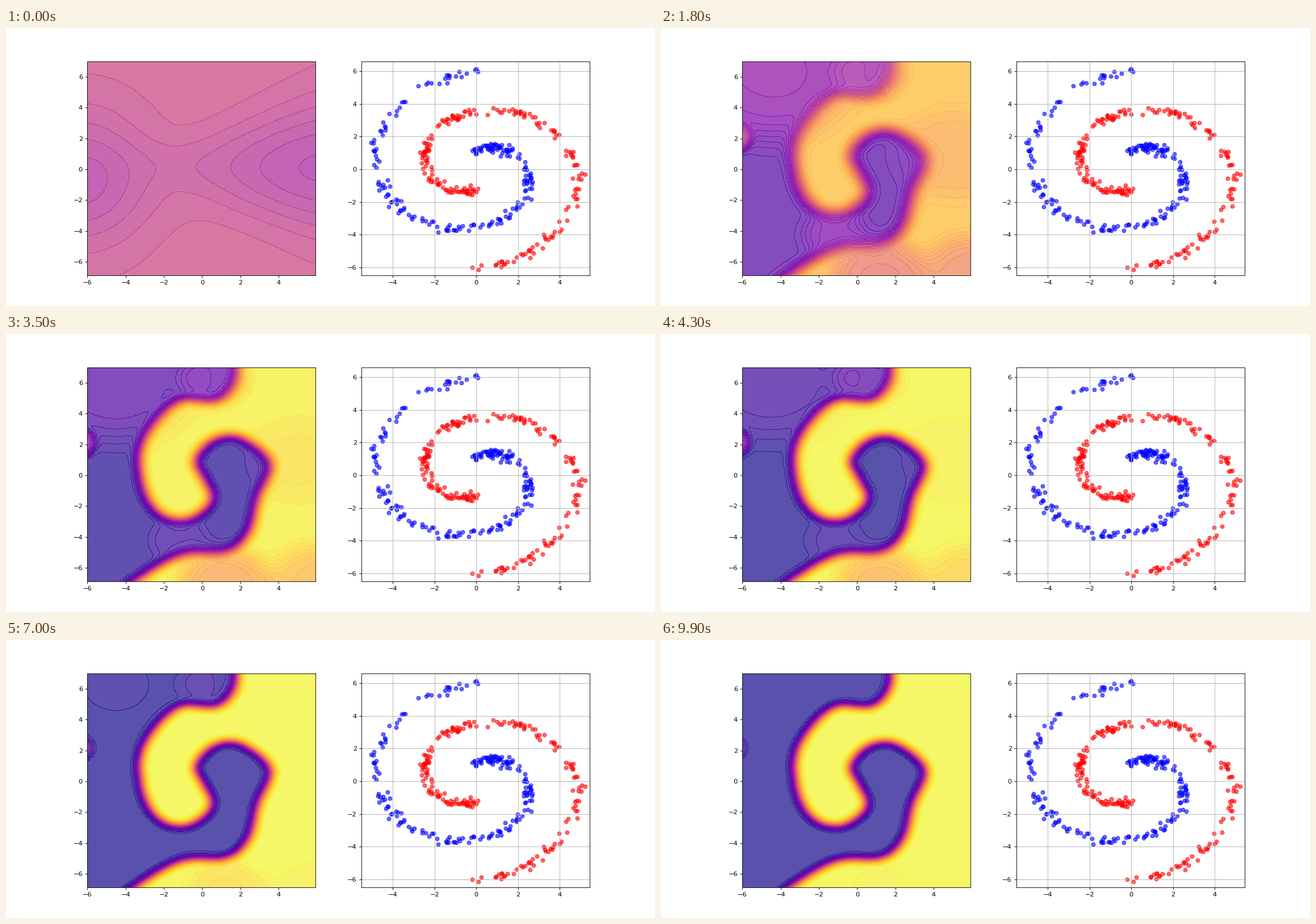
Recreate the animation shown at these times as a matplotlib script. Size 1143x490 px, loop 10000 ms.

```python
import numpy as np
import matplotlib.pyplot as plt
from matplotlib.animation import FuncAnimation
from matplotlib.path import Path

WIDTH, HEIGHT = 1143, 490
DPI = WIDTH / 14
FRAMES, INTERVAL = 100, 100
EPS = 1e-6  # keeps the pixel size from rounding down

XLIM, YLIM = (-6.008, 5.93), (-6.894, 7.0)
LEVELS = np.linspace(0, 1, 50)
POINTS = 200

# Key points of the decision boundary, from the top edge to the bottom edge.
EDGE = [
    (1.8, 8.5), (1.77, 6.2), (0.8, 4.83), (-1.06, 4.84), (-2.4, 3.46),
    (-3.2, 1.55), (-3.0, -0.96), (-2.1, -2.55), (-0.7, -2.82), (0.47, -1.6),
    (0.03, -0.2), (-0.38, 1.0), (0.57, 2.32), (2.0, 2.48), (3.6, 0.8),
    (2.94, -1.5), (2.46, -3.72), (1.31, -5.0), (-1.06, -5.2), (-3.49, -6.9),
    (-5, -8.5),
]

# Places that are learned late: x, y, extra delay in frames, radius.
BASE_DELAY = 15
SLOW_SPOTS = [
    (-4.5, 6.3, 14, 4.2), (-6.6, 2.1, 60, 0.9), (0.6, 6.3, 18, 1.8),
    (-1.2, -4.2, 7, 1.6), (1.2, -7.2, 30, 2.4), (6, -7, 18, 2.5),
    (5, 1, 5, 3),
]


def spiral(sign, rng):
    theta = 1.5 + 6.4 * rng.random(POINTS) ** 1.15
    arm = sign * 0.76 * theta * np.array([-np.cos(theta), np.sin(theta)])
    return arm + rng.normal(0, 0.14, arm.shape)


def smooth_curve(points, steps=8):
    """Catmull-Rom spline through the points."""
    p = np.array(points, float)
    p = np.vstack([2 * p[0] - p[1], p, 2 * p[-1] - p[-2]])
    t = np.linspace(0, 1, steps, endpoint=False)[:, None]
    return np.vstack([
        b + (c - a) * t / 2 + (2 * a - 5 * b + 4 * c - d) * t ** 2 / 2
        + (3 * b - a - 3 * c + d) * t ** 3 / 2
        for a, b, c, d in zip(p, p[1:], p[2:], p[3:])] + [p[-2:-1]])


xs = np.linspace(*XLIM, 120)
ys = np.linspace(*YLIM, 140)
X, Y = np.meshgrid(xs, ys)
fine_x = np.arange(XLIM[0] - 1.5, XLIM[1] + 1.5, 0.04)
fine_y = np.arange(YLIM[0] - 1.5, YLIM[1] + 1.5, 0.04)


def inside(edge):
    outline = np.vstack([smooth_curve(edge), [(9, -9), (9, 9)]])
    gx, gy = np.meshgrid(fine_x, fine_y)
    hit = Path(outline).contains_points(np.c_[gx.ravel(), gy.ravel()])
    return hit.reshape(gx.shape).astype(float)


def kernel(out, grid, sigma):
    k = np.exp(-((out[:, None] - grid) / sigma) ** 2 / 2)
    return k / k.sum(1, keepdims=True)


def blur(mask, sigma):
    return kernel(ys, fine_y, sigma) @ mask @ kernel(xs, fine_x, sigma).T


def start_field():
    left = np.exp(-(X + 6.3) ** 2 / 12 - ((Y + .6) / 4.6) ** 2)
    height = np.maximum(2.2 + .34 * X, 1.7)
    right = np.exp(-((X - 6.5) / 7) ** 2 - ((Y - .3) / height) ** 2)
    dip = np.exp(-((Y + 2) / 2) ** 2)
    return .48 - .095 * left - .115 * right - .008 * dip


mask = inside(EDGE)
start_bias = start_field() - .5
delay = BASE_DELAY + sum(
    extra * np.exp(-(((X - x) ** 2 + (Y - y) ** 2) / r ** 2) ** 2)
    for x, y, extra, r in SLOW_SPOTS)


def probability(k):
    """The boundary sharpens while confidence grows at each place's own pace."""
    side = 2 * blur(mask, .24 + .5 * np.exp(-k / 12)) - 1
    confidence = 1 - np.exp(-(k / delay) ** 1.3)
    p = .5 + .5 * side * confidence + start_bias * np.exp(-k / 8)
    return np.clip(p, .001, .999)


fig, (ax_map, ax_data) = plt.subplots(
    1, 2, figsize=((WIDTH + EPS) / DPI, (HEIGHT + EPS) / DPI), dpi=DPI)
fig.subplots_adjust(right=.8996)
ax_map.set(xlim=XLIM, ylim=YLIM)

rng = np.random.default_rng(4)
ax_data.scatter(*spiral(-1, rng), c="r", alpha=.6)
ax_data.scatter(*spiral(1, rng), c="b", alpha=.6)
ax_data.set(xlim=(-5.505, 5.435), ylim=(-6.489, 6.597))
ax_data.grid(True)

bands = []


def update(k):
    while bands:
        bands.pop().remove()
    # Unsmoothed edges overlap by a pixel, which gives the fine contour lines.
    bands.append(ax_map.contourf(X, Y, probability(k), LEVELS, cmap="plasma",
                                 alpha=.7, antialiased=False))
    return bands


anim = FuncAnimation(fig, update, frames=FRAMES, interval=INTERVAL,
                     repeat=True, repeat_delay=0, blit=False)
plt.show()
```
